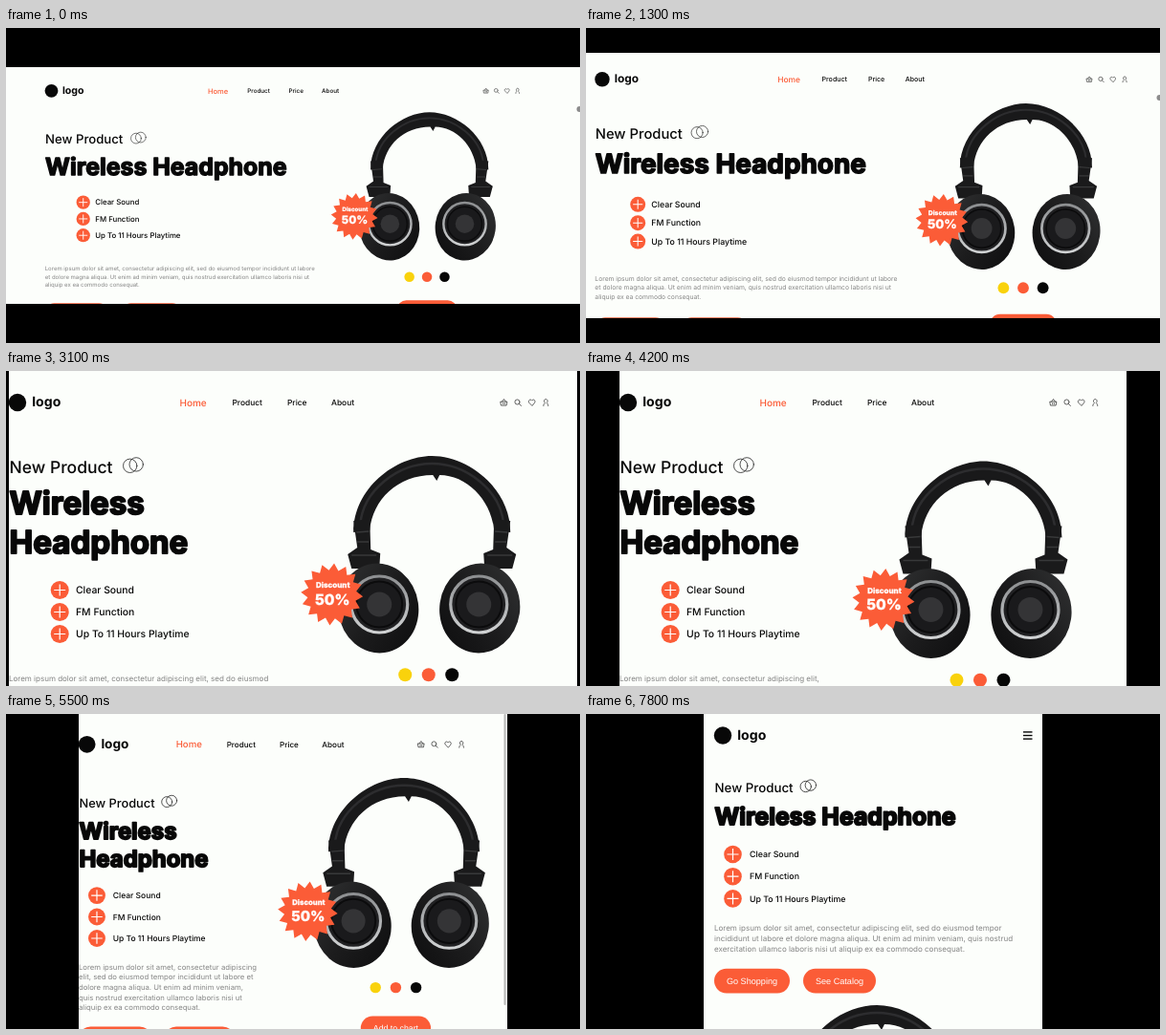
An HTML page that plays this animation: 600x330 px, repeating every 8 s.

```html
<!DOCTYPE html>
<html lang="en">
<head>
<meta charset="utf-8">
<title>Wireless Headphone</title>
<style>
  html, body { margin: 0; width: 100%; height: 100%; overflow: hidden; background: #000; }
  #stage { display: block; width: 600px; height: 330px; }
  text {
    font-family: Inter, "Open Sans", sans-serif;
    font-weight: 500;
    font-optical-sizing: none;
    text-rendering: geometricPrecision;
    fill: #080808;
  }
  .title { font-weight: 700; stroke: #080808; stroke-width: 1.9; stroke-linejoin: round; }
  .logo { font-weight: 700; }
  .para { font-weight: 400; fill: #858585; }
  .home { fill: #fb5c37; }
  .btn { font-family: "Liberation Sans", Arial, sans-serif; font-weight: 400; fill: #fff; }
  .badge { font-weight: 800; fill: #fff; stroke: #fff; stroke-width: .3; stroke-linejoin: round; }
  .icon { fill: none; stroke: #222; stroke-width: .8; stroke-linejoin: round; stroke-linecap: round; }
</style>
</head>
<body>
<svg id="stage" viewBox="0 0 600 330">
  <defs>
    <clipPath id="clip"><rect id="clipBox"/></clipPath>
    <linearGradient id="shell" x1="0" y1="0" x2="1" y2="1">
      <stop offset="0" stop-color="#323334"/><stop offset=".5" stop-color="#1c1c1d"/><stop offset="1" stop-color="#0d0d0e"/>
    </linearGradient>
    <linearGradient id="metal" x1="0" y1="0" x2="0" y2="1">
      <stop offset="0" stop-color="#8d8f91"/><stop offset=".6" stop-color="#b4b6b8"/><stop offset="1" stop-color="#d0d2d3"/>
    </linearGradient>
    <g id="arm">
      <path d="M-82 68L-65 66L-64 98L-54 102L-55 118L-84 118L-88 103L-78 96Z" fill="#1a1a1b"/>
      <path d="M-79 80L-66 79M-78 90L-66 90M-84 104L-58 104" stroke="#38393a" stroke-width="1.4" fill="none"/>
    </g>
    <g id="cup">
      <ellipse cx="-53" cy="159.5" rx="42" ry="47" fill="url(#shell)" transform="rotate(-8 -53 159.5)"/>
      <circle cx="-52" cy="155.5" r="29.5" fill="#202022" stroke="url(#metal)" stroke-width="3.2"/>
      <circle cx="-52" cy="155.5" r="24" fill="#1a1a1c" stroke="#0b0b0c" stroke-width="2"/>
      <circle cx="-52" cy="155.5" r="13" fill="#343436"/>
    </g>
    <g id="phones">
      <g transform="translate(3 0)">
        <path d="M-82 80C-82 34 -38 0 0 0S82 34 82 80L65 78C62 46 36 20 8 20L5 26L1 20C-36 20 -62 46 -65 78Z" fill="#19191a"/>
        <path d="M-75 72C-72 36 -36 8 0 8S72 36 75 72" fill="none" stroke="#2d2d2f" stroke-width="2.5"/>
        <use href="#arm"/>
        <use href="#arm" transform="scale(-1 1)"/>
      </g>
      <use href="#cup"/>
      <use href="#cup" transform="scale(-1 1)"/>
    </g>
  </defs>
  <rect width="600" height="330"/>
  <g clip-path="url(#clip)"><g id="page"></g></g>
  <g id="over"></g>
  <text id="ruler" class="para" font-size="8" visibility="hidden"></text>
</svg>
<script>
const LOOP = 8000, STEP = 100;
const ORANGE = '#fb5c37', PAPER = '#fcfefb';
const $ = id => document.getElementById(id);

// [ms, inset]: black bars above and below, then at the sides
const TOP = [[0, 41], [900, 32], [1300, 26], [1800, 17.5], [2400, 11], [2700, 6], [3000, 0]];
const SIDE = [[3000, 0], [3100, 3], [3600, 19], [4200, 35], [4500, 42], [4700, 42], [5100, 56],
  [5200, 56], [5500, 76], [6100, 92], [6800, 92], [7700, 123]];

// Sizes in page units; y values are text centres for a one-line title
const WIDE = {
  nav: 33, intro: [100.3, 17.5], rings: [119.5, 7.2], title: [138, 41, 33.1],
  list: [188.5, 23, 53.2, 9.5, 70, 10.4], para: 281, gap: 26, buttons: [88, 19, 83],
  phones: 63, dots: [292.3, 24.5, 7], cart: [325, 83], rows: 3, shift: 0.5
};
const TABLET = {
  nav: 33, intro: [96.6, 13.3], rings: [90, 5.7], title: [127, 30, 24.8],
  list: [167.3, 23.3, 19.7, 9.3, 37.2, 8.8], para: 245, gap: 20.8, buttons: [79, 14, 76],
  phones: 54.6, dots: [282.5, 22, 5.9], cart: [313.6, 76], rows: 5, shift: 6
};
const MOBILE = {
  ...TABLET, nav: 22.5, intro: [77, 13.3], title: [107, 30, 24.8],
  list: [147, 23.2, 19.5, 9.3, 37, 8.8], para: 224, phones: 305
};

const LOREM = ('Lorem ipsum dolor sit amet, consectetur adipiscing elit, sed do eiusmod tempor ' +
  'incididunt ut labore et dolore magna aliqua. Ut enim ad minim veniam, quis nostrud ' +
  'exercitation ullamco laboris nisi ut aliquip ex ea commodo consequat.').split(' ');
const PARA_SIZE = 8, SPACE = 2.25;
const wordWidths = LOREM.map(w => {
  $('ruler').textContent = w;
  return $('ruler').getComputedTextLength();
});
$('ruler').remove();

function track(keys, t) {
  if (t <= keys[0][0]) return keys[0][1];
  for (let i = 1; i < keys.length; i++) {
    const [t0, a] = keys[i - 1], [t1, b] = keys[i];
    if (t < t1) return a + (b - a) * (t - t0) / (t1 - t0);
  }
  return keys[keys.length - 1][1];
}

function wrap(width) {
  const lines = [];
  let used = Infinity;
  LOREM.forEach((word, i) => {
    if (used + SPACE + wordWidths[i] > width) {
      lines.push(word);
      used = wordWidths[i];
    } else {
      lines[lines.length - 1] += ' ' + word;
      used += SPACE + wordWidths[i];
    }
  });
  return lines;
}

const text = (str, x, y, size, cls = '', anchor = 'start') =>
  `<text x="${x}" y="${y + size * 0.36}" font-size="${size}" class="${cls}" text-anchor="${anchor}">${str}</text>`;
const circle = (x, y, r, fill, extra = '') => `<circle cx="${x}" cy="${y}" r="${r}" fill="${fill}" ${extra}/>`;
const rect = (x, y, w, h, fill, r = 0) =>
  `<rect x="${x}" y="${y}" width="${w}" height="${h}" rx="${r}" fill="${fill}"/>`;
const button = (str, x, y, w) =>
  rect(x, y, w, 25.6, ORANGE, 12.8) + text(str, x + w / 2, y + 12.6, 9.1, 'btn', 'middle');

const ICONS = [
  'M-3.8 -1H3.8L3 3.5H-3ZM-2.2 -1L0 -4L2.2 -1M-1 .8V2M1 .8V2',
  'M2.2 -.6A2.9 2.9 0 1 1 -3.6 -.6A2.9 2.9 0 1 1 2.2 -.6M1.4 1.6L3.8 4',
  'M0 3.6L-3.4 .2C-5 -2 -2 -5 0 -2.2C2 -5 5 -2 3.4 .2Z',
  'M-2.8 4C-2.8 1.6 -1.6 1.2 -1 .6C-3 -1.4 -1.8 -4 0 -4S3 -1.4 1 .6C1.6 1.2 2.8 1.6 2.8 4'
];

const STAR = Array.from({ length: 32 }, (_, i) => {
  const a = i * Math.PI / 16 - 1.5, r = i % 2 ? 25.5 : 32.5;
  return (r * Math.cos(a)).toFixed(2) + ',' + (r * Math.sin(a)).toFixed(2);
}).join(' ');
const BADGE = `<polygon points="${STAR}" fill="${ORANGE}"/>` +
  text('Discount', 1, -9.5, 8, 'badge', 'middle') + text('50%', 0.5, 5, 15.5, 'badge', 'middle');

function navbar(m, x, c, width) {
  let out = circle(x + 9, m.nav, 9.2, '#080808') + text('logo', x + 24.3, m.nav - 0.8, 14.1, 'logo');
  if (m === MOBILE) {
    for (const dy of [-3.6, 0, 3.6]) out += rect(width - 20, m.nav + dy - 0.7, 9.5, 1.4, '#080808');
    return out;
  }
  const home = x + 146 + (c - 529) / 2;
  out += text('Home', home, m.nav, 10, 'home');
  [['Product', 55], ['Price', 112.5], ['About', 158.5]].forEach(([s, dx]) => {
    out += text(s, home + dx, m.nav, 8.4);
  });
  ICONS.forEach((d, i) => {
    const ix = x + c - 76.5 + i * 14.6;
    out += `<path class="icon" d="${d}" transform="translate(${ix} ${m.nav}) scale(.88)"/>`;
  });
  return out;
}

function page(m, width) {
  const c = m === WIDE ? Math.min(width, 690) : width;
  const x = m === MOBILE ? 11 : (width - c) / 2;
  const column = m === WIDE ? c - 311 : m === TABLET ? c * 0.437 : c - 24;
  const [ty, lead, size] = m.title;
  const title = m === MOBILE || (m === WIDE && column >= 337)
    ? ['Wireless Headphone'] : ['Wireless', 'Headphone'];
  const down = lead * (title.length - 1);
  const lines = wrap(column);

  let out = rect(-5, -5, 1000, 500, PAPER) + navbar(m, x, c, width);

  const [iy, introSize] = m.intro, [rx, r] = m.rings;
  out += text('New Product', x + 0.5, iy, introSize);
  out += circle(x + rx + r, iy - 1, r, 'none', 'class="icon"');
  out += circle(x + rx + r * 1.9, iy - 2.4, r, 'none', 'class="icon"');
  title.forEach((s, i) => out += text(s, x + 0.5, ty + i * lead, size, 'title'));

  const [ly, pitch, dotX, dotR, textX, listSize] = m.list;
  ['Clear Sound', 'FM Function', 'Up To 11 Hours Playtime'].forEach((s, i) => {
    const y = ly + down + i * pitch, cx = x + dotX;
    out += circle(cx, y, dotR, ORANGE);
    out += `<path d="M${cx - 6} ${y}h12M${cx} ${y - 6}v12" stroke="#fff" stroke-width="1.2"/>`;
    out += text(s, x + textX, y, listSize);
  });

  const py = m.para + down;
  lines.forEach((s, i) => out += text(s, x, py + i * 11, PARA_SIZE, 'para'));
  const by = py + (lines.length - 1) * 11 + m.gap, [w1, space, w2] = m.buttons;
  out += button('Go Shopping', x, by, w1) + button('See Catalog', x + w1 + space, by, w2);

  // right column, centred against the left one
  const mid = m === WIDE ? x + 376 + (c - 529) * 0.965
    : m === TABLET ? 344 + Math.max(0, c - 465) * 0.6 : width / 2 - 5;
  const off = m === MOBILE ? 0 : (down + 11 * (lines.length - m.rows)) / 2;
  const px = mid + m.shift, top = m.phones + off;
  out += `<use href="#phones" x="${px}" y="${top}"/>`;
  out += `<g transform="translate(${px - 101.5} ${top + 145})">${BADGE}</g>`;
  if (m !== MOBILE) {
    const [dy, gap, dr] = m.dots, [cy, cw] = m.cart;
    ['#f9d20c', ORANGE, '#060606'].forEach((f, i) => out += circle(mid + (i - 1) * gap, dy + off, dr, f));
    out += button('Add to chart', mid - cw / 2, cy + off, cw);
  }
  return out;
}

function overlay(t, m, right) {
  if (t < 1900) return circle(599.5, 85 - t * 12 / 1300, 3, '#8c8c8c');
  if (m === TABLET) return rect(right - 3.5, 0, 2, 305, '#b8b8b8', 1);
  if (m === MOBILE && t < 6400) {
    return `<g opacity="${t < 6300 ? 1 : 0.5}">${rect(right - 4.5, 2, 2, 203, '#b8b8b8', 1)}</g>`;
  }
  return '';
}

function draw(t) {
  const top = track(TOP, t), side = track(SIDE, t);
  const m = t < 4900 ? WIDE : t < 5700 ? TABLET : MOBILE;
  const w = 600 - 2 * side, h = 330 - 2 * top;
  // the tablet page overflows and is zoomed out to fit
  const scale = m === TABLET ? Math.min(1, w / 465) : h / 330;
  const width = m === TABLET ? w : w / scale;
  Object.entries({ x: side, y: top, width: w, height: h }).forEach(([k, v]) => $('clipBox').setAttribute(k, v));
  $('page').setAttribute('transform', `translate(${side} ${top}) scale(${scale})`);
  $('page').innerHTML = page(m, width);
  $('over').innerHTML = overlay(t, m, 600 - side);
}

let shown = -1;
function tick() {
  const t = Math.floor(performance.now() % LOOP / STEP) * STEP;
  if (t !== shown) draw(shown = t);
  requestAnimationFrame(tick);
}
tick();
</script>
</body>
</html>
```
